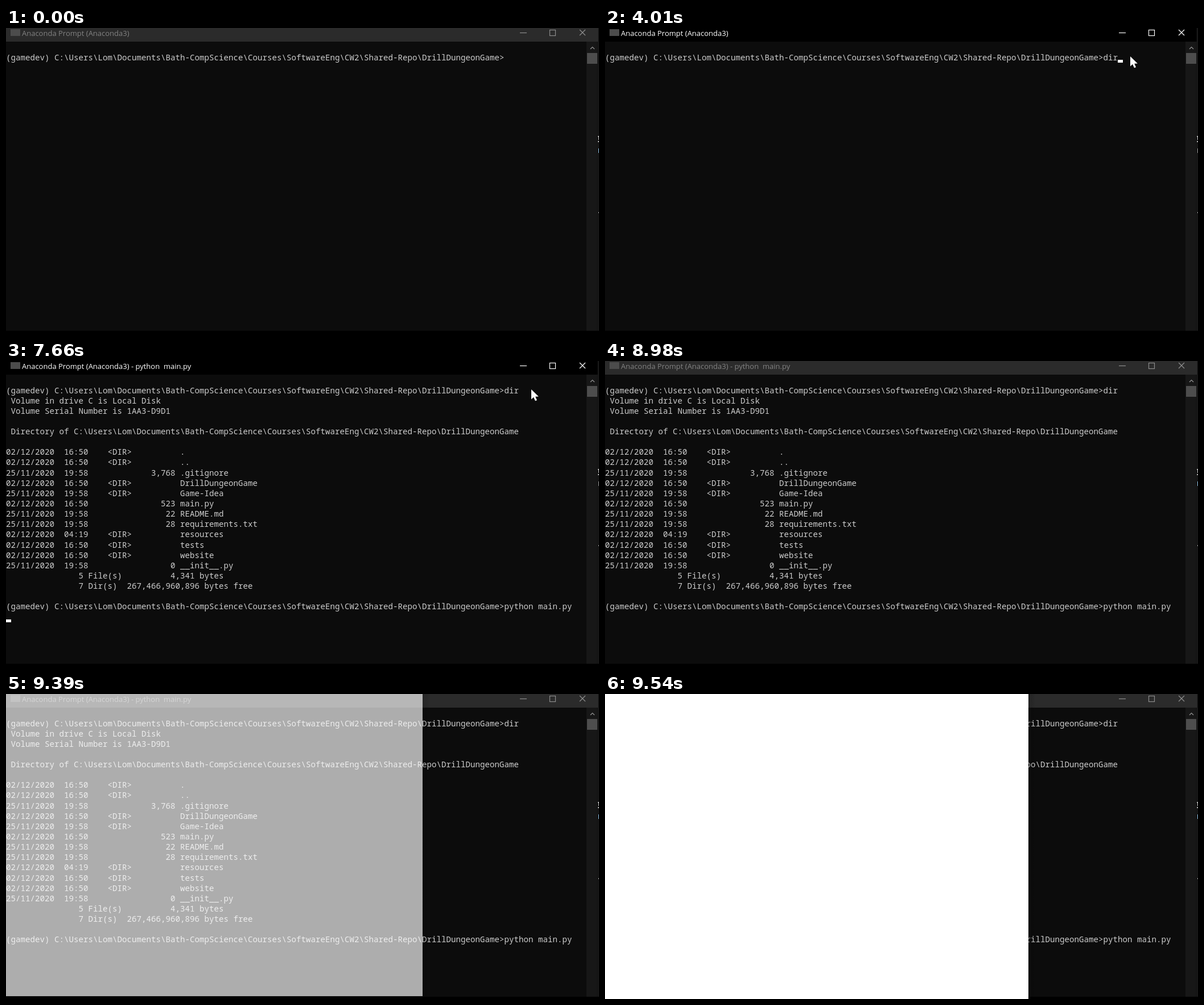
Write an HTML page with a canvas that moves like this. It is 1042 by 537 pixels and loops after 9.91 s.

```html
<!DOCTYPE html>
<html lang="en">
<head>
<meta charset="utf-8">
<title>Console session</title>
<style>
html, body { margin: 0; width: 100%; height: 100%; overflow: hidden; background: #0c0c0c; }
canvas { display: block; }
</style>
</head>
<body>
<canvas id="stage" width="1042" height="537"></canvas>
<script>
const ctx = document.getElementById('stage').getContext('2d', { alpha: false });
const LOOP = 9910, CELL = 8.5, LINE = 18.14;
const FOCUS = 2390, BLUR = 8290, LISTED = 4180, LAUNCHED = 7660;

const path = 'C:\\Users\\Lom\\Documents\\Bath-CompScience\\Courses\\SoftwareEng\\CW2\\Shared-Repo\\DrillDungeonGame';
const prompt = `(gamedev) ${path}>`;

const entry = (day, time, size, name) =>
  `${day}/2020  ${time}    ` + (size === '' ? '<DIR>'.padEnd(14) : size.padStart(14)) + ' ' + name;
const DEC = '02/12', NOV = '25/11';
const listing = [
  ' Volume in drive C is Local Disk',
  ' Volume Serial Number is 1AA3-D9D1',
  '',
  ' Directory of ' + path,
  '',
  entry(DEC, '16:50', '', '.'),
  entry(DEC, '16:50', '', '..'),
  entry(NOV, '19:58', '3,768', '.gitignore'),
  entry(DEC, '16:50', '', 'DrillDungeonGame'),
  entry(NOV, '19:58', '', 'Game-Idea'),
  entry(DEC, '16:50', '523', 'main.py'),
  entry(NOV, '19:58', '22', 'README.md'),
  entry(NOV, '19:58', '28', 'requirements.txt'),
  entry(DEC, '04:19', '', 'resources'),
  entry(DEC, '16:50', '', 'tests'),
  entry(DEC, '16:50', '', 'website'),
  entry(NOV, '19:58', '0', '__init__.py'),
  ' '.repeat(15) + '5 File(s)          4,341 bytes',
  ' '.repeat(15) + '7 Dir(s)  267,466,960,896 bytes free',
  ''
];

// Each track is a list of [start time, value...]; a value holds until the next.
const firstCommand = [[0, ''], [3860, 'd'], [3930, 'di'], [4010, 'dir']];
const secondCommand = [
  [0, ''], [4710, 'p'], [4940, 'py'], [5110, 'pyt'], [5260, 'pyth'], [5420, 'pytho'],
  [5490, 'python'], [5570, 'python '], [6270, 'python m'], [6350, 'python ma'],
  [6430, 'python mai'], [6510, 'python main'], [6590, 'python mainn'], [6670, 'python main'],
  [6900, 'python main.'], [7130, 'python main.p'], [7280, 'python main.py']
];
const caret = [
  [0, false], [FOCUS, true], [2940, false], [3460, true], [5030, false], [5110, true],
  [6120, false], [6270, true], [8200, false]
];
const pointer = [
  [0], [70, 904, 448], [140, 862, 250], [210, 833, 111],
  [1920, 843, 105], [1990, 905, 80], [2070, 968, 58], [2240, 903, 54],
  [2390, 915, 56], [2460, 927, 57], [2540, 931, 57], [3170, 927, 53], [3230, 923, 50],
  [8600], [8750, 1016, 181], [8830, 900, 350], [8900, 782, 514], [8980]
];
// Opening window: opacity, right edge, bottom edge
const popup = [[0], [9300, 0.25, 720, 525], [9390, 0.663, 732, 532], [9460, 0.94, 741, 537], [9540, 1, 744, 537]];

const at = (track, t) => track.findLast(step => step[0] <= t).slice(1);

function rect(color, x, y, w, h) {
  ctx.fillStyle = color;
  ctx.fillRect(x, y, w, h);
}

function polyline(color, points) {
  ctx.strokeStyle = color;
  ctx.lineWidth = 1.2;
  ctx.beginPath();
  for (const [x, y] of points) ctx.lineTo(x, y);
  ctx.stroke();
}

function drawLine(text, row) {
  const y = Math.round(56.5 + row * LINE);
  ctx.font = '14.17px "Noto Sans Mono", monospace';
  ctx.fillStyle = '#cccccc';
  [...text].forEach((char, col) => { if (char !== ' ') ctx.fillText(char, col * CELL, y); });
}

function drawFrame(active, title) {
  const ink = active ? '#ffffff' : '#8c8c8c';
  rect('#0c0c0c', 0, 0, 1042, 537);
  rect(active ? '#000000' : '#2b2b2b', 0, 0, 1040, 24);
  rect('#4c4c4c', 8, 2, 17, 12);

  ctx.font = '13px "Open Sans", sans-serif';
  ctx.fillStyle = active ? '#ffffff' : '#828282';
  ctx.fillText(title, 28, 14);

  polyline(ink, [[903, 8.5], [915, 8.5]]);
  ctx.strokeRect(955.5, 3.5, 10, 10);
  polyline(ink, [[1008, 3], [1018, 13]]);
  polyline(ink, [[1018, 3], [1008, 13]]);

  rect('#171717', 1020, 24, 19, 509);
  rect('#4d4d4d', 1021, 44, 18, 19);
  polyline('#969696', [[1027, 37], [1030.5, 33.5], [1034, 37]]);

  rect('#000000', 0, 533, 1042, 4);
  rect('#262626', 1040, 0, 1, 533);
  rect('#b4b4b4', 1040, 190, 2, 2);
  rect('#b4b4b4', 1041, 192, 1, 5);
  rect('#b4b4b4', 1040, 199, 2, 2);
  rect(active ? '#8a8a8a' : '#7fb4d8', 1041, 212, 1, 8);
  rect('#a0a0a0', 1041, 324, 1, 2);
}

function drawPointer(x, y) {
  if (x === undefined) return;
  const outline = [[0, 0], [0, 17.5], [4, 13.8], [7, 20.3], [10, 19], [7.2, 12.8], [12.8, 12.5]];
  ctx.beginPath();
  for (const [dx, dy] of outline) ctx.lineTo(x + dx, y + dy);
  ctx.closePath();
  ctx.fillStyle = '#ffffff';
  ctx.fill();
}

function drawPopup(alpha, right, bottom) {
  if (!alpha) return;
  rect(`rgba(255, 255, 255, ${alpha})`, 0, 0, right, bottom);
  const shadow = ctx.createLinearGradient(right, 0, right + 12, 0);
  shadow.addColorStop(0, `rgba(0, 0, 0, ${alpha * 0.2})`);
  shadow.addColorStop(1, 'rgba(0, 0, 0, 0)');
  rect(shadow, right, 0, 12, bottom);
}

function render(t) {
  const launched = t >= LAUNCHED;
  drawFrame(t >= FOCUS && t < BLUR, 'Anaconda Prompt (Anaconda3)' + (launched ? ' - python  main.py' : ''));

  const lines = [prompt + at(firstCommand, t)[0]];
  if (t >= LISTED) lines.push(...listing, prompt + at(secondCommand, t)[0]);
  if (launched) lines.push('');
  lines.forEach(drawLine);

  if (at(caret, t)[0]) {
    const row = lines.length - 1;
    rect('#ffffff', Math.round(lines[row].length * CELL), Math.floor(61 + row * LINE) - 5, 9, 5);
  }
  drawPointer(...at(pointer, t));
  drawPopup(...at(popup, t));
}

function tick() {
  render(performance.now() % LOOP);
  requestAnimationFrame(tick);
}
tick();
</script>
</body>
</html>
```
